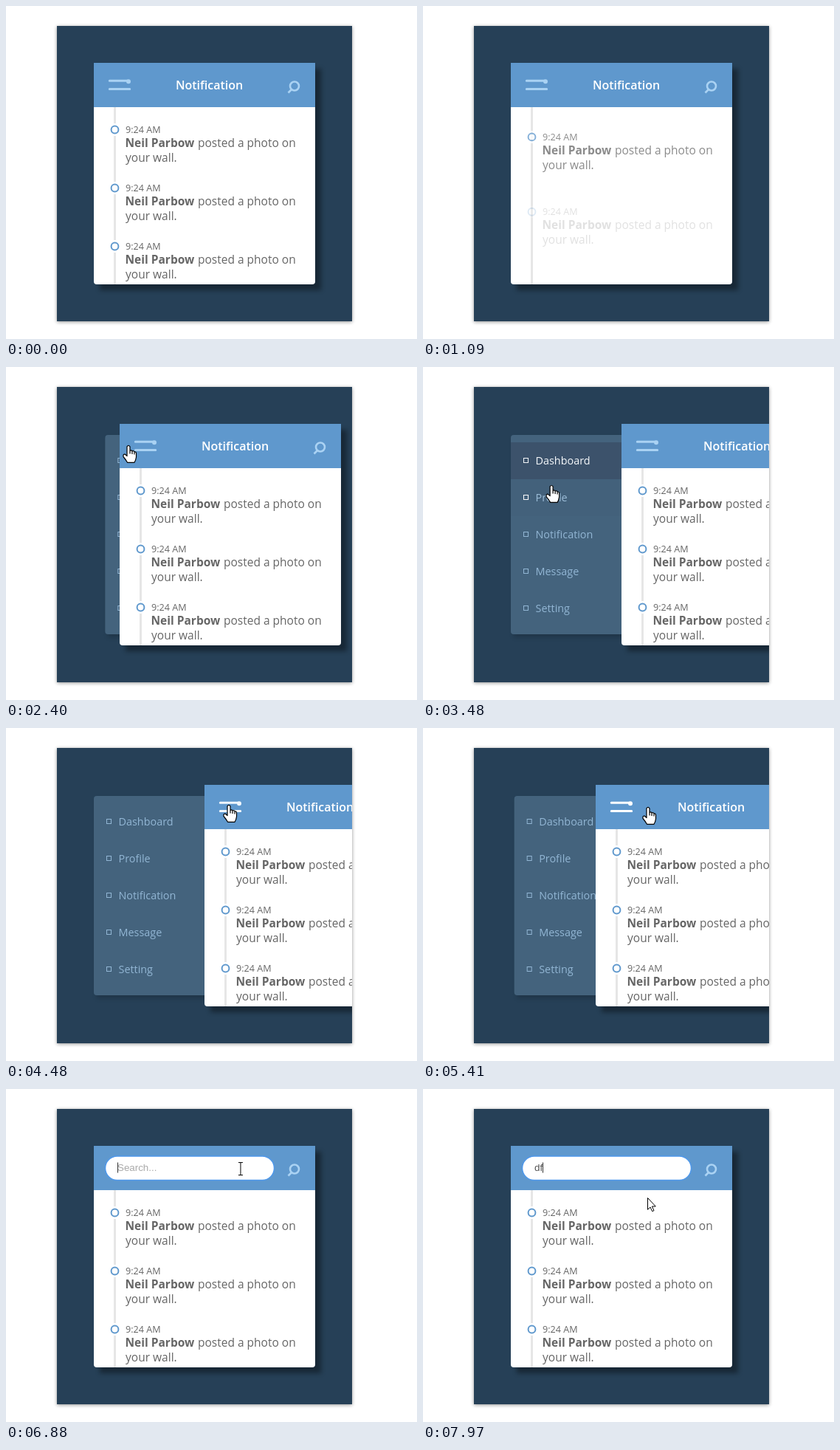
These frames come from a looping animation (557 by 451 pixels, 8 s). An HTML page:

```html
<!DOCTYPE html>
<html lang="en">
<head>
<meta charset="utf-8">
<title>Notification panel</title>
<style>
  html, body { margin: 0; width: 100%; height: 100%; overflow: hidden; background: #fff; }
  svg { display: block; width: 557px; height: 451px; font-family: "Open Sans", "Noto Sans", sans-serif; }
  .soft { filter: blur(2.5px); }
  .shadow { filter: blur(3px); }
  .time { font-size: 12.6px; }
  .body { font-size: 15.5px; }
  .name { font-weight: 700; }
  .title { font-size: 16px; font-weight: 600; fill: #fff; text-anchor: middle; }
  .menu { font-size: 14.4px; }
  .field { font: 13.33px "Liberation Sans", Arial, sans-serif; }
</style>
</head>
<body>
<svg id="stage" viewBox="0 0 557 451"></svg>
<script>
const LOOP = 8000;
const LABELS = ["Dashboard", "Profile", "Notification", "Message", "Setting"];
// Menu hover spans: row: [on, off]
const HOVERS = { 0: [2950, 3460], 1: [3460, 3640], 2: [3880, 4190] };
// Pointer path: time, x, y of the tip
const PATH = [
  [1300, 222, 6], [1630, 183, 78], [1940, 166, 106], [2950, 166, 106],
  [3180, 166, 125], [3330, 166, 125], [3480, 174, 160], [4100, 251, 222],
  [4480, 302, 104], [4710, 302, 104], [4790, 306, 104], [4940, 306, 104],
  [5040, 305, 107], [5720, 305, 107], [6020, 391, 109], [6560, 391, 109],
  [6710, 318, 108], [6880, 318, 108], [7280, 303, 143], [7420, 303, 143],
  [7580, 304, 147]
];
const HAND = [[1860, 4230], [4400, 5760], [5950, 6620]];
const BEAM = [6620, 7060];

const row = (label, i) => `
  <g class="row" transform="translate(0 ${i * 50})">
    <rect class="back" x="119" y="102" width="170" height="50" fill="#3c5169"/>
    <rect class="box" x="136.5" y="123.5" width="6" height="6" fill="none"/>
    <text class="menu" x="152.5" y="131.5">${label}</text>
  </g>`;

const item = i => `
  <g class="item">
    <g transform="translate(0 ${i * 79})">
      <circle cx="147.5" cy="167.5" r="8.5" fill="#fff"/>
      <circle cx="147.5" cy="167.5" r="4.9" fill="#fff" stroke="#5f98cd" stroke-width="2"/>
      <text class="time" x="162" y="172">9:24 AM</text>
      <text class="body name" x="161.5" y="191">Neil Parbow</text>
      <text class="body" x="260" y="191">posted a photo on</text>
      <text class="body" x="162" y="211">your wall.</text>
    </g>
  </g>`;

stage.innerHTML = `
  <clipPath id="frame"><rect x="69" y="27" width="400" height="400"/></clipPath>
  <rect class="soft" x="69" y="28" width="400" height="400" fill="#000" opacity=".42"/>
  <rect x="69" y="27" width="400" height="400" fill="#264057"/>
  <g clip-path="url(#frame)">
    <g id="menu">
      <rect class="shadow" x="123" y="96" width="170" height="270" opacity=".18"/>
      <rect x="119" y="92" width="170" height="270" rx="4" fill="#44637d"/>
      ${LABELS.map(row).join("")}
    </g>
    <g id="card">
      <rect class="shadow" x="127" y="85" width="300" height="300" opacity=".38"/>
      <path d="M119 77H419V373a4 4 0 0 1-4 4H123a4 4 0 0 1-4-4Z" fill="#fff"/>
      <rect x="119" y="77" width="300" height="60" fill="#5f98cd"/>
      <g id="burger" stroke-width="3" stroke-linecap="round">
        <path d="M140.3 101.3H165M140.3 112.5H167.7"/>
        <circle cx="166" cy="102.3" r="3" stroke="none"/>
      </g>
      <text class="title" x="275.5" y="112.5">Notification</text>
      <g id="lens" fill="none" stroke-width="2.6">
        <circle cx="391" cy="108.5" r="6"/>
        <path d="M387 113L382.5 117.5"/>
      </g>
      <g id="search">
        <rect id="field" x="134.5" y="91" width="229" height="32.5" rx="16.2" fill="#fff" stroke="#4f98ea"/>
        <text id="typed" class="field" x="151" y="111"></text>
        <rect id="caret" y="99.5" width="1" height="14" fill="#333"/>
      </g>
      <rect x="146" y="137" width="3" height="240" fill="#e6e6e6"/>
      <g fill="#666">${[0, 1, 2].map(item).join("")}</g>
    </g>
  </g>
  <g id="pointer" stroke="#000" stroke-linejoin="round" fill="#fff">
    <path id="arrow" d="M.5 .5V16.3L4 13 6.7 18.7 9 17.6 6.4 12H11.3Z"/>
    <path id="hand" stroke-width="1.2" d="M-2 1.8Q0-1 2 1.8V7.5Q4.2 6 5 8Q7.2 7 8 9Q10.5 8.5 10.5 11V16Q10 20 8 23.3H-1.5Q-4 19-7 15.5Q-7.5 12-5 12L-2 14.5ZM2 7V11.5M5 8V12M8 9.5V12.5"/>
    <path id="beam" fill="none" d="M-3-8.5H3M0-8.5V8.5M-3 8.5H3"/>
  </g>`;

const all = selector => [...stage.querySelectorAll(selector)];
const rows = all(".row"), items = all(".item");
const el = id => document.getElementById(id);
const clamp = p => Math.min(1, Math.max(0, p));
const ramp = (t, start, length) => clamp((t - start) / length);
const smooth = p => p * p * (3 - 2 * p);
const span = (t, [on, off]) => t >= on && t < off;
const fade = (t, [on, off], d) => ramp(t, on, d) * (1 - ramp(t, off, d));
const mix = (a, b, p) => `rgb(${a.map((v, i) => Math.round(v + (b[i] - v) * p))})`;
const set = (node, name, value) => node.setAttribute(name, value);
const show = (id, on) => set(el(id), "visibility", on ? "visible" : "hidden");
const WHITE = [255, 255, 255], PALE = [170, 210, 243], DIM = [146, 182, 212];

function drawMenu(t) {
  const open = smooth(ramp(t, 2263, 440)) - smooth(ramp(t, 5273, 440));
  set(el("card"), "transform", `translate(${Math.round(150 * open)})`);
  set(el("menu"), "transform", `translate(${20 * (1 - open)})`);
  rows.forEach((r, i) => {
    const hover = HOVERS[i] || [LOOP, LOOP];
    const lit = fade(t, hover, 220);
    const [back, box, label] = r.children;
    set(back, "opacity", lit);
    set(box, "stroke", mix(DIM, WHITE, span(t, hover) ? 1 : lit));
    set(label, "fill", mix(DIM, WHITE, lit));
  });
}

function drawCard(t) {
  items.forEach((node, i) => {
    const p = t < 470 ? 1 : ramp(t, 840 + 200 * i, 500);
    const k = 1 - (1 - p) ** 2;
    set(node, "opacity", k);
    set(node, "transform", `translate(0 ${40 * (1 - k)})`);
  });
  const burger = mix(PALE, WHITE, fade(t, [1840, 2270], 100) + fade(t, [4400, 5440], 100));
  set(el("burger"), "stroke", burger);
  set(el("burger"), "fill", burger);
  set(el("lens"), "stroke", mix(PALE, WHITE, fade(t, [5900, 6600], 100)));
}

function drawSearch(t) {
  set(el("search"), "opacity", smooth(ramp(t, 6200, 320)));
  set(el("field"), "stroke-width", t >= 6880 ? 1.5 : 0);
  const text = t < 7900 ? "Search..." : t < 7970 ? "d" : "df";
  const typed = el("typed");
  if (typed.textContent !== text) typed.textContent = text;
  set(typed, "fill", t < 7900 ? "#a9a9a9" : "#555");
  set(el("caret"), "x", t < 7900 ? 151 : t < 7970 ? 159 : 162);
  show("caret", span(t, [6880, 7420]) || t >= 7900);
}

function drawPointer(t) {
  const last = PATH.length - 1;
  let i = PATH.findIndex(k => k[0] > t);
  if (i < 0) i = last;
  const a = PATH[Math.max(0, i - 1)], b = PATH[i];
  const p = a === b ? 0 : ramp(t, a[0], b[0] - a[0]);
  set(el("pointer"), "transform", `translate(${a[1] + (b[1] - a[1]) * p} ${a[2] + (b[2] - a[2]) * p})`);
  const hand = HAND.some(s => span(t, s)), beam = span(t, BEAM);
  show("hand", hand);
  show("beam", beam);
  show("arrow", t >= PATH[0][0] && !hand && !beam);
}

function tick() {
  const t = performance.now() % LOOP;
  drawMenu(t);
  drawCard(t);
  drawSearch(t);
  drawPointer(t);
  requestAnimationFrame(tick);
}
tick();
</script>
</body>
</html>
```
